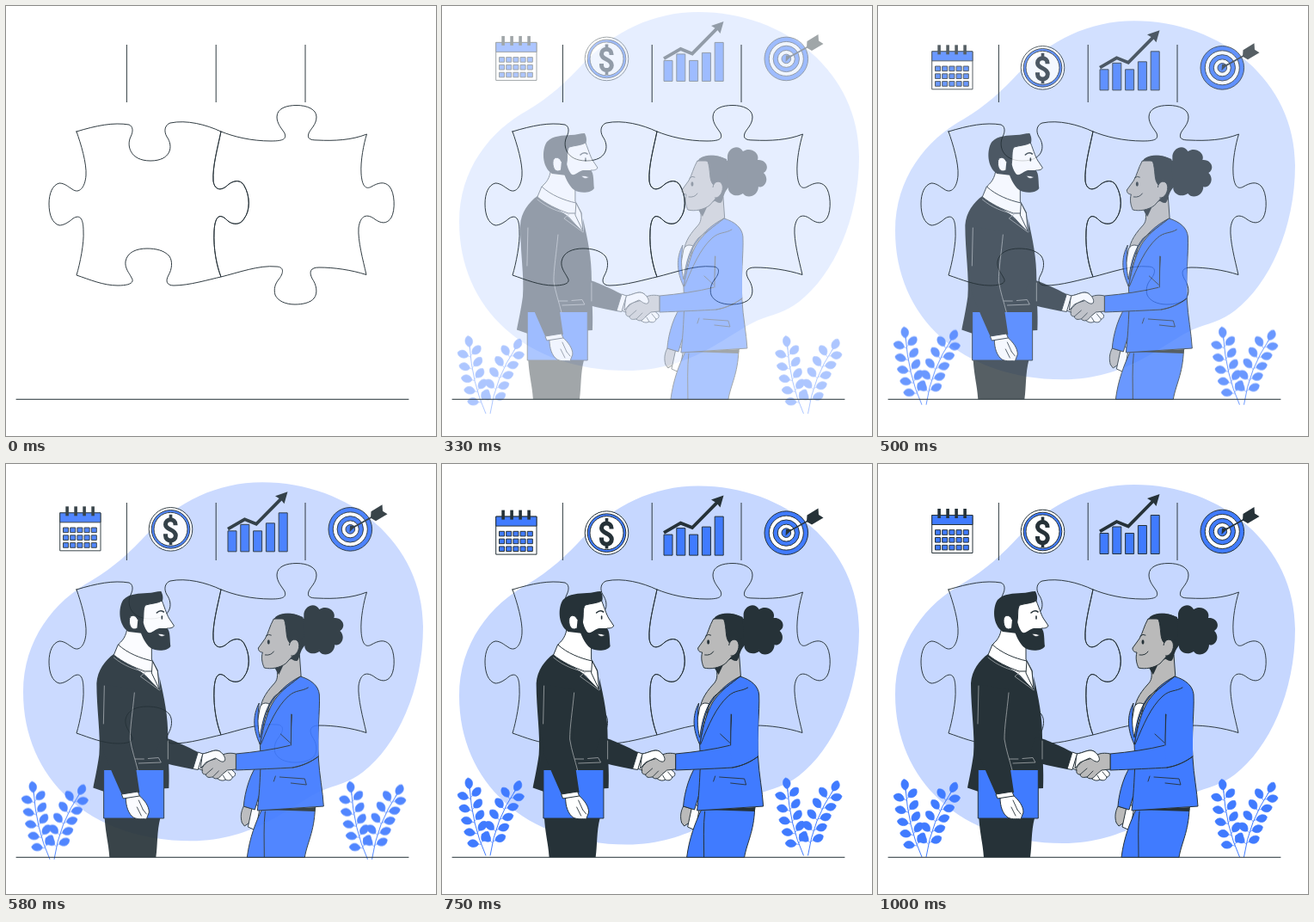
An HTML page that plays this animation: 500x500 px, repeating every 1.04 s.

```html
<!DOCTYPE html>
<html lang="en">
<head>
<meta charset="utf-8">
<title>Partnership</title>
<style>
html, body { margin: 0; width: 100%; height: 100%; overflow: hidden; background: #fff; }
svg { display: block; width: 100vw; height: 100vh; }
.l { fill: none; stroke: #263238; stroke-linecap: round; stroke-linejoin: round; }
.b { fill: #407bff; }
.d { fill: #263238; }
.w { fill: #fff; }
.g { fill: #bababa; }
.b, .w, .g { stroke: #263238; stroke-linejoin: round; }
.s { fill: none; stroke: #a5aaad; stroke-width: .8; stroke-linecap: round; }
#plants { fill: #407bff; stroke: #407bff; }
</style>
</head>
<body>
<svg viewBox="0 0 500 500" xmlns="http://www.w3.org/2000/svg">
  <path id="blob" fill="#c6d7ff" d="M298 24C400 24 485 95 485 192C485 265 455 330 415 361C400 373 383 376 366 383C330 400 290 441 215 441C97 441 20 368 20 268C20 207 56 162 100 138C125 123 145 105 165 83C200 47 245 24 298 24Z"/>

  <g class="l" stroke-width=".95">
    <path d="M82 146C105 139 125 135 143 138C148 140 148 146 145 152C140 162 144 180 168 180C192 180 195 163 187 152C183 145 185 138 191 136C210 132 233 138 250 146C246 165 240 187 241 203C242 213 249 216 257 209C262 204 272 200 277 209C284 221 284 238 277 247C272 256 262 254 257 249C249 241 243 243 242 262C241 283 245 302 250 315C236 318 213 325 195 325C187 325 185 320 189 313C193 306 194 297 190 291C184 284 174 282 164 282C152 282 141 286 139 297C138 305 143 310 146 316C150 322 143 325 130 325C113 325 97 318 82 313C86 300 91 275 90 262C90 247 86 242 78 247C71 253 66 255 62 255C54 253 50 243 50 230C50 218 54 208 62 206C68 206 72 210 77 213C85 219 92 211 93 197C94 183 87 160 82 146Z"/>
    <path d="M250 146C265 152 285 157 308 157C324 157 326 154 324 148C321 143 315 137 315 129C315 119 326 115.5 338 115.5C350 115.5 361 120 361 129C361 138 354 143 352 148C350 154 353 156 362 156C382 157 402 156 419.500 149C416 160 412 180 413 195C414 209 418 214 425 210C432 206 440 203 446 210C452 217 453 237 448 246C443 254 436 253 429 248C420 241 412 243 410 258C409 273 415 295 419 312.500C402 307 382 304 364 304C354 304 352 309 356 317C361 324 363 334 358 340C354 345 345 347 336 347C325 347 316 343 313 336C311 329 313 323 317 318C322 312 325 303 314 303C295 301 270 310 250 315C245 302 241 283 242 262C243 243 249 241 257 249C262 254 272 256 277 247C284 238 284 221 277 209C272 200 262 204 257 209C249 216 242 213 241 203C240 187 246 165 250 146Z"/>
    <path stroke-linecap="butt" d="M140.400 45V112M244.200 45V112M348 45V112"/>
  </g>

  <g id="plants"><g id="sprigs"></g><use href="#sprigs" x="369.500"/></g>
  <path class="l" d="M12 457.300H468"/>

  <g id="icons">
    <path class="w" d="M62.700 59.500H110V103.500H62.700Z"/>
    <path class="b" d="M62.700 59.500H110V70.500H62.700Z"/>
    <g id="days"></g>

    <g id="coin">
      <circle class="w" cx="191.500" cy="78.500" r="25.300"/>
      <circle class="b" cx="191.500" cy="78.500" r="22.300"/>
      <circle class="w" cx="191.500" cy="78.500" r="19.500"/>
      <path class="l" stroke-width="5" style="stroke-linecap:butt" d="M197 74V73C197 65.500 185.500 65.500 185.500 73C185.500 80 197.300 78 197.300 86C197.300 93.500 185.500 93.500 185.500 86V84"/>
      <path class="l" stroke-width="3.600" style="stroke-linecap:butt" d="M191.500 61.500V68M191.500 91V97"/>
    </g>

    <g id="bars"></g>
    <path class="l" stroke-width="3.800" style="stroke-linecap:butt;stroke-linejoin:miter" d="M258 78.300L277.500 67L291 72.500L321 42"/>
    <path class="d" d="M327.500 35L323.500 49L319.500 44L313 40Z"/>

    <g id="rings"></g>
    <path class="l" stroke-width="1.700" d="M402 77.500L428 63"/>
    <path class="d" d="M399.500 82L400 74.500L407 74.500ZM424 65.500L424.500 58L437.500 50L438 57.500L443.500 61L430 69Z"/>
  </g>

  <g id="pair">
    <!-- woman: far arm, trousers, jacket -->
    <path class="g" d="M279 398C276 404 275 410 277 417L280 421L286 417L289 401Z"/>
    <path class="w" d="M290 394L298 399L293 426L284 422Z"/>
    <path class="b" d="M298 346C287 357 280 382 279 398L292 402L301 372Z"/>
    <path class="b" d="M300 402C293 417 286 434 283 457.300H350C353 440 361 428 362 401Z"/>
    <path class="l" d="M304 404C302 420 303 440 303 457"/>
    <path class="d" d="M304 402L363 399L362 404Z"/>
    <path class="g" d="M317 234C319 247 319 251 313 257C304 267 298 277 298 290L307 288L346 250L344 222Z"/>
    <path class="d" d="M315 237L326 232L320 245Z"/>
    <path class="w" d="M298 283C300 278 304 277 309 279L304 303L298 326L294 305Z"/>
    <path class="b" d="M345 247C358 251 366 258 367 268C368 288 364 315 366 342C367 362 371 380 372 398L295 403C298 377 298 362 299 346L298 326C303 299 309 282 316 273C324 262 335 255 345 247Z"/>
    <path class="b" d="M345 247C329 255 317 267 309 281C302 296 301 312 298 326C290 309 289 293 297 278C295 292 295 306 298 318C301 296 306 281 315 270Z"/>
    <path class="l" d="M354 260C346 265 340 262 331 270C317 283 309 302 299 326"/>
    <path class="l" stroke-width=".9" d="M322 314L334 325M314 369L316 363M321 364L350 366L352 373L334 371"/>
    <path class="b" d="M335 291L334 327C314 332 292 335 270 337V356C295 355 320 354 336 353C348 351 358 346 366 340"/>
    <path fill="#407bff" d="M336 291H366V339L336 352L333 328Z"/>
    <path class="l" d="M334.500 291L334 327M366 340C358 346 348 351 336 353"/>

    <!-- woman: head -->
    <path class="d" d="M349 174C351 163 363 161 367 169C376 163 387 171 384 179C394 178 399 189 391 194C399 202 391 213 385 210C385 221 372 225 367 218C358 224 349 217 350 211C343 219 345 226 341 229C333 229 329 221 328 211L316 178C327 171 341 173 349 180Z"/>
    <path class="g" d="M314 180C309 189 308 196 304 203L296 214C296 218 299 219 301 219C299 226 301 233 303 237C311 239 321 237 328 232L337 222L333 208C327 203 330 192 326 180Z"/>
    <path class="d" d="M314 181C318 172 335 172 348 178L349 202L335 210C328 207 331 195 327 182C323 179 318 179 314 181Z"/>
    <path class="g" d="M332 211C333 203 341 202 343 208C345 215 340 224 334 223"/>
    <ellipse class="d" cx="308" cy="207" rx="1.500" ry="2.700"/>
    <path class="l" d="M305 200Q308 197 311 199M304 222Q311 223 314 218"/>

    <!-- man: trousers, jacket -->
    <path class="d" d="M117 375H186L182 412C178 427 179 443 177 457.300H123C122 440 118 430 117 405Z"/>
    <path class="w" d="M144 184C144 197 140 204 134 209L130 221L165 246L181 264L179 240L172 227V212L160 188Z"/>
    <path class="d" d="M128 221C118 228 109 240 108 255C108 285 113 315 111 338C109 353 106 366 104 376.500L117 381L192 377C193 355 191 342 191 318C191 292 187 274 181 247L182 263L161 243Z"/>
    <path class="d" d="M183 317C196 320 214 329 226 335L220 355C203 352 188 348 174 344Z"/>
    <path class="w" d="M133 210C144 220 159 226 173 229L176 241L164 241C150 236 138 230 128 222Z"/>
    <path class="w" d="M173 229L179 241L181 262L172 243Z"/>
    <path class="s" d="M128 225C140 235 152 239 165 242L159 247L181 263"/>

    <!-- man: book, near arm -->
    <path class="b" d="M116.300 355.500H186.300V412H116.300Z"/>
    <path class="d" d="M109 255L116 335L127 361L138 386L158 382L151 335L152 262Z"/>
    <path class="s" d="M117 258L116 302M152 266C150 288 147 305 147 320C149 333 153 344 156 356M153 343H163M168 342.500L180 341.500L183 347L157 348M191 322V343"/>
    <path class="w" d="M142 388C142 398 145 407 151 411C157 414 162 412 166 413L169 405C169 398 164 391 157 385Z"/>
    <path class="w" d="M137 384L156 381L158 386L139 389Z"/>
    <path class="l" stroke-width=".9" d="M157 391L162 402M155 399L160 409M162 402L166 407"/>

    <!-- handshake -->
    <path class="w" d="M231 337C239 336 245 331 251 334C257 338 260 345 257 348L269 359C270 363 267 364 266 364C265 369 260 368 258 367C253 370 248 366 244 362L226 354Z"/>
    <path class="g" d="M270 337C261 335 254 337 249 342L239 345C235 348 229 353 231 356C230 361 234 361 235 361C236 366 241 364 243 364C247 368 251 365 254 361L260 356L270 355Z"/>
    <path class="w" d="M231 337C239 336 245 331 251 334C257 338 259 344 256 346C252 347 249 343 246 342L235 347L229 354Z"/>
    <path class="w" d="M226 335L231.500 337L226 355.500L220 354.500Z"/>
    <path class="l" stroke-width=".9" d="M235 361L243 354M243 364L250 357M258 367L255 362M266 364L261 358"/>

    <!-- man: head -->
    <path class="d" d="M145 195C133 187 133 167 139 158C146 150 158 151 167 150C173 150 178 148 183 148C185 152 186 156 184 161L186 167L162 197Z"/>
    <path class="w" d="M184 159C188 169 190 177 194 182L198 188C197 191 193 191 190 191V198L166 200L161 186C164 179 161 168 165 164C172 162 179 162 184 159Z"/>
    <path class="d" d="M158 167C162 178 161 186 167 195C171 199 175 192 181 191L190 191C194 194 193 205 194 212C190 218 177 218 171 214C164 209 160 199 156 186Z"/>
    <path class="w" stroke-width=".6" d="M179 197.500Q184 197 188 199Q183 202.500 179 197.500Z"/>
    <path class="w" d="M156 181C153 174 146 175 146 182C146 190 150 194 155 191"/>
    <path class="l" stroke-width="1.600" d="M178 173Q182 169 186 172M184 177V180"/>
  </g>
</svg>
<script>
const LOOP = 1040, FPS = 24, LEAD = 0.018, SHIFT = 30;
const $ = id => document.getElementById(id);

const rect = (x, y, w, h, cls) => `<rect class="${cls}" x="${x}" y="${y}" width="${w}" height="${h}"/>`;

function sprig(x0, y0, cx, cy, x1, y1) {
  let out = `<path fill="none" d="M${x0} ${y0}Q${cx} ${cy} ${x1} ${y1}"/>`;
  const leaf = (t, turn) => {
    const u = 1 - t;
    const x = u * u * x0 + 2 * u * t * cx + t * t * x1;
    const y = u * u * y0 + 2 * u * t * cy + t * t * y1;
    const a = Math.atan2(u * (cy - y0) + t * (y1 - cy), u * (cx - x0) + t * (x1 - cx));
    out += `<path stroke-width=".6" transform="translate(${x} ${y}) rotate(${a * 180 / Math.PI + turn})" d="M0 0H3C5-6 14-6 16-1C14 5 7 6 3 0"/>`;
  };
  for (let i = 0; i < 5; i++) {
    leaf(0.18 + i * 0.165, -60);
    leaf(0.2 + i * 0.165, 56);
  }
  leaf(0.94, 0);
  return out;
}

function build() {
  $('sprigs').innerHTML = sprig(51, 457, 35, 422, 32, 377) + sprig(56, 457, 62, 415, 86, 380);

  let days = '';
  for (let r = 0; r < 3; r++)
    for (let c = 0; c < 5; c++) days += rect(66.5 + c * 8.2, 76.7 + r * 8.8, 6, 5.6, 'b');
  for (let i = 0; i < 4; i++) days += rect(69.3 + i * 10, 52, 3.6, 11, 'd');
  $('days').innerHTML = days;

  $('bars').innerHTML = [80.5, 73, 80.5, 71.5, 59.5]
    .map((y, i) => rect(258 + i * 14.8, y, 10, 104.5 - y, 'b')).join('');

  $('rings').innerHTML = [25.3, 20, 15.2, 10, 5.3]
    .map((r, i) => `<circle class="${i % 2 ? 'w' : 'b'}" cx="400.3" cy="78.5" r="${r}"/>`).join('');
}

// cubic-bezier(.36, -.01, .5, 1.38)
function ease(t) {
  if (t <= 0) return 0;
  if (t >= 1) return 1;
  const curve = (s, a, b) => 3 * (1 - s) * (1 - s) * s * a + 3 * (1 - s) * s * s * b + s * s * s;
  let lo = 0, hi = 1;
  for (let i = 0; i < 24; i++) {
    const mid = (lo + hi) / 2;
    if (curve(mid, 0.36, 0.5) < t) lo = mid; else hi = mid;
  }
  return curve(lo, -0.01, 1.38);
}

// entry directions
const movers = [['blob', 0, -1], ['icons', 0, -1], ['plants', 0, 1], ['pair', -1, 0]];

function draw(ms) {
  const step = Math.floor(((ms % LOOP) + 5) * FPS / 1000);
  const p = step < 2 ? 0 : ease(step / FPS + LEAD);
  const off = SHIFT * (1 - p);
  for (const [id, dx, dy] of movers) {
    const el = $(id);
    el.setAttribute('transform', `translate(${dx * off} ${dy * off})`);
    el.setAttribute('opacity', Math.min(1, Math.max(0, p)));
  }
}

build();
draw(0);
let start;
function tick(now) {
  start ??= now;
  draw(now - start);
  requestAnimationFrame(tick);
}
requestAnimationFrame(tick);
</script>
</body>
</html>
```
